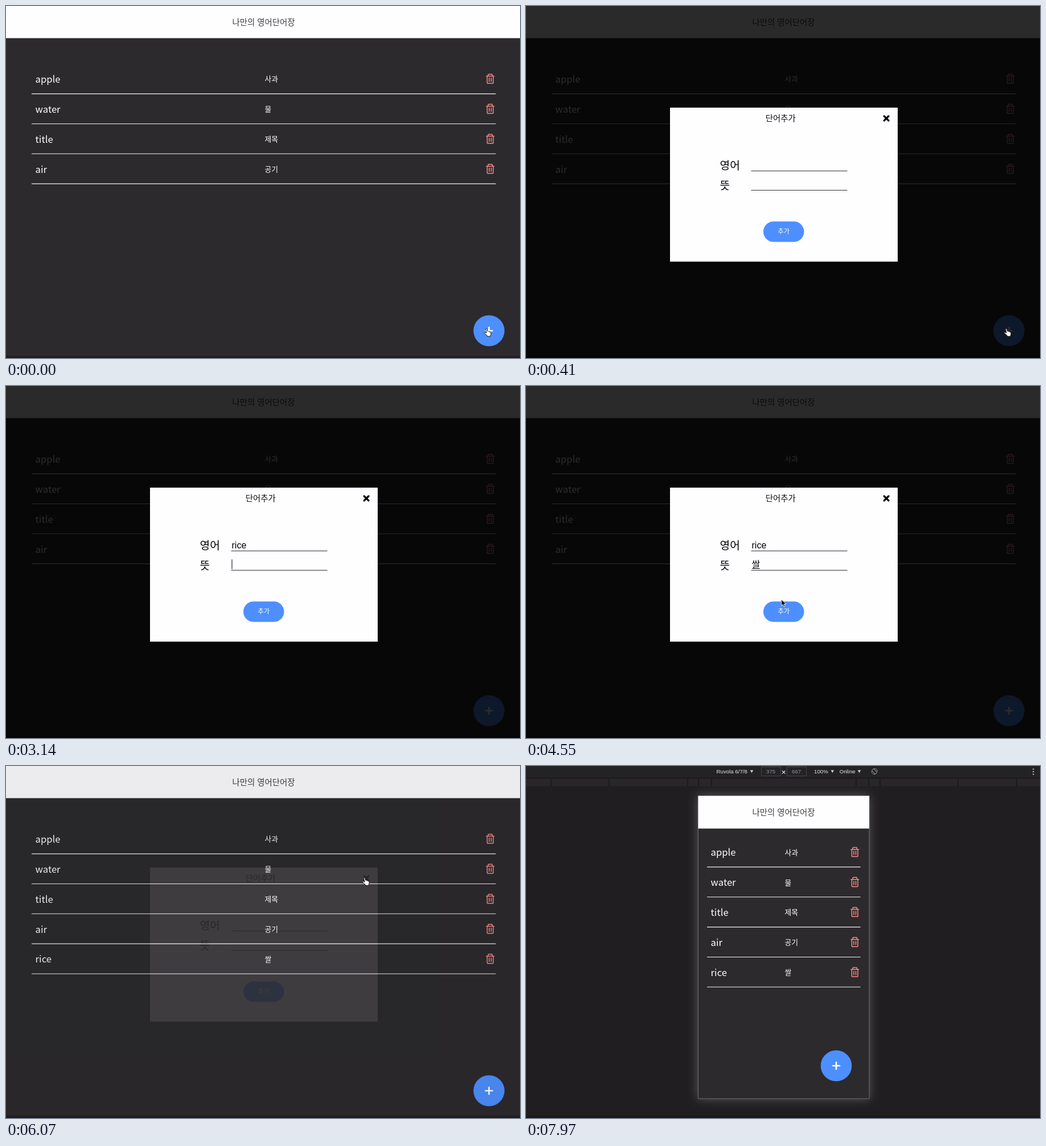
Animation, 903 px wide and 620 px high, one loop 8000 ms. Source, as an HTML page:

```html
<!DOCTYPE html>
<html lang="ko">
<head>
<meta charset="utf-8">
<title>나만의 영어단어장</title>
<style>
  html, body { margin: 0; width: 100%; height: 100%; overflow: hidden; background: #2c2a2d; }
  svg { display: block; width: 903px; height: 620px; }
  text { font-family: "Noto Sans CJK KR", "Noto Sans CJK", "Noto Sans KR", sans-serif; white-space: pre; }
  .title { font-size: 14.4px; font-weight: 500; fill: #3f3d40; text-anchor: middle; }
  .word { font-size: 16.65px; fill: #fefdff; }
  .meaning { font-size: 12.8px; font-weight: 300; fill: #fefdff; }
  .trash { fill: none; stroke: #f98b88; stroke-width: 1.5; stroke-linejoin: round; stroke-linecap: round; }
  .label { font-size: 19.2px; fill: #000; }
  .field { font: 16px "Liberation Sans", "Noto Sans CJK KR", "Noto Sans CJK", sans-serif; fill: #000; }
  .tool { font: 9.7px "Liberation Sans", Arial, sans-serif; fill: #e4e3e6; }
  .dim { fill: #929196; }
</style>
</head>
<body>
<svg id="stage" viewBox="0 0 903 620" xmlns="http://www.w3.org/2000/svg">
  <defs>
    <filter id="glow" x="-20%" y="-20%" width="140%" height="140%"><feGaussianBlur stdDeviation="9"/></filter>
  </defs>
  <g id="wide"></g>
  <g id="phone"></g>
  <g id="modal">
    <rect width="903" height="620" fill="#000" fill-opacity=".83"/>
    <rect x="253" y="179" width="400" height="271.3" fill="#fefdff"/>
    <text x="447.3" y="203.4" text-anchor="middle" font-size="14.4" font-weight="300" fill="#111">단어추가</text>
    <path d="M629.2 194l7.8 7.8M637 194l-7.8 7.8" stroke="#000" stroke-width="3.2" stroke-linecap="round"/>
    <text class="label" x="340.6" y="288.2">영어</text>
    <text class="label" x="340.6" y="322.8">뜻</text>
    <path d="M395.5 290.5h169M395.5 324.5h169" stroke="#333136" stroke-width="1.2"/>
    <text class="field" id="english" x="396.5" y="286"></text>
    <text class="field" id="korean" x="396.5" y="319.6"></text>
    <path id="compose" d="M397.2 321.4h13.6" stroke="#000"/>
    <rect id="caret" width="1" height="17"/>
    <rect x="417" y="379.5" width="71.5" height="36" rx="18" fill="#4d8fff"/>
    <text x="452.7" y="401.2" text-anchor="middle" font-size="11.2" font-weight="500" fill="#fff">추가</text>
  </g>
  <g id="cursor">
    <path id="hand" fill="#fff" stroke="#111" stroke-width="1" stroke-linejoin="round"
      d="M-1.3.8C-1.1-.5.7-.5 1.1.8L2.2 4.6C3-.1+3.5 4 4.2 4.5 4.6 5.2 3.9 6.3 4.2 6.6 5.1 7.3 4.7 8.5 5.2 8.6 6.1 8.9 8.5 8.2 10 7.7 11.6L7.6 13.6H1.6L.6 11.8C-.6 10.4-1.8 9-3.4 7.9-4.4 7-3.4 5.9-2.2 6.3L-.2 7.3Z"/>
    <path id="arrow" fill="#000" stroke="#fff" stroke-width=".9" stroke-linejoin="round"
      d="M0 0V11.2L2.6 8.8 4.4 13 6.4 12.2 4.6 8.1H8.2Z"/>
    <path id="ibeam" fill="none" stroke="#222" stroke-width="1.1"
      d="M-3-6.8Q0-6.8 0-5Q0-6.8 3-6.8M0-5V5M-3 6.8Q0 6.8 0 5Q0 6.8 3 6.8M-1.5.8h3"/>
  </g>
</svg>
<script>
const $ = id => document.getElementById(id);
const LOOP = 8000, ADDED = 4850, CUT = 7720;
const words = [['apple', '사과'], ['water', '물'], ['title', '제목'], ['air', '공기'], ['rice', '쌀']];

// A smooth pointing hand replaces the rough outline in the markup.
$('hand').setAttribute('d', 'M-1.2 1C-1.2-.4.6-.5 1 .9L2.1 4.7C3.2 4.2 4 4.5 4.3 5.2 5.3 4.9 6 5.2 6.3 6 7.4 5.8 8 6.4 8.1 7.5 8.4 9.4 8 10.6 7.4 11.8V13.6H1.8L1.4 12.2C-.2 10.9-1.4 9.4-3.2 8-4.2 7-3.2 5.9-2 6.4L.2 7.7Z');

const trash = (x, y) => `<path class="trash" transform="translate(${x} ${y})"
  d="M-6.8-4.6H6.8M-3.6-4.8V-7.2Q-3.6-8 -2.8-8H2.8Q3.6-8 3.6-7.2V-4.8M-5.3-4.4V7Q-5.3 8.1-4.2 8.1H4.2Q5.3 8.1 5.3 7V-4.4M-1.8-1.4V4.8M1.8-1.4V4.8"/>`;

const row = (left, right, dy, i) => {
  const y = dy + i * 52.85;
  return `<g class="row${i}"><text class="word" x="${left + 6.6}" y="${y + 135}">${words[i][0]}</text>
    <text class="meaning" x="454.6" y="${y + 133.4}">${words[i][1]}</text>
    ${trash(right - 9.8, y + 128.2)}
    <path d="M${left} ${y + 154.6}H${right}" stroke="#f3f2f4" stroke-width="1.1"/></g>`;
};
const list = (left, right, dy) => words.map((_, i) => row(left, right, dy, i)).join('');

const addButton = (x, y) => `<circle cx="${x}" cy="${y}" r="27.3" fill="#4d8fff"/>
  <path d="M${x - 6} ${y}h12M${x} ${y - 6}v12" stroke="#fff" stroke-width="2.7" stroke-linecap="round"/>`;

const strip = color => `<rect y="616.5" width="903" height="4" fill="${color}"/>`;

$('wide').innerHTML = `<rect width="903" height="620" fill="#2c2a2d"/>${strip('#231b20')}
  <rect width="903" height="56.6" fill="#fefdff"/>
  <text class="title" x="452.6" y="33.9">나만의 영어단어장</text>
  ${list(45, 860.5, 0)}${addButton(848.5, 572)}`;

const down = x => `<path d="M${x - 2.8} 7.2h5.6l-2.8 5z" fill="#c9c8cc"/>`;
const label = (x, text, dim = '') => `<text class="tool ${dim}" x="${x}" y="13">${text}</text>`;
const sizeBox = x => `<rect x="${x}" y="1.5" width="34" height="16" fill="#242326" stroke="#454348"/>`;
const marks = [44, 146, 284, 303, 326, 580, 602, 622, 759, 862];

$('phone').innerHTML = `<rect width="903" height="620" fill="#201e21"/>${strip('#1b161a')}
  <rect width="903" height="20.5" fill="#232225"/>
  <rect y="22" width="903" height="13.5" fill="#282629"/>
  <path d="M0 21.2H903${marks.map(x => `M${x} 22v13.5`).join('')}" stroke="#1a181b" stroke-width="1.6"/>
  ${label(334.5, 'Ruvola 6/7/8')}${down(396.5)}${sizeBox(413.5)}${sizeBox(458.5)}
  ${label(422, '375', 'dim')}${label(467, '667', 'dim')}
  <path d="M450 8.2l5.4 5.4M455.4 8.2l-5.4 5.4" stroke="#d8d7da" stroke-width="1.3"/>
  ${label(506, '100%')}${down(538.3)}${label(550.7, 'Online')}${down(585.5)}
  <g fill="none" stroke="#929196"><rect x="609.9" y="5" width="4.6" height="9" rx="1" transform="rotate(-45 612.2 9.5)"/>
    <path d="M611 4.6a5 5 0 0 1 6.2 5.6M613.4 14.4a5 5 0 0 1-6.2-5.6"/></g>
  ${[5.5, 10, 14.5].map(y => `<circle cx="891.3" cy="${y}" r="1.3" fill="#a9a8ac"/>`).join('')}
  <rect x="302" y="52" width="301" height="534" fill="#fff" fill-opacity=".26" filter="url(#glow)"/>
  <rect x="302.5" y="52.5" width="300.5" height="533.5" fill="#2c2a2d" stroke="#6f6d70"/>
  <rect x="302.5" y="52.7" width="300.5" height="57.5" fill="#fefdff"/>
  <text class="title" x="452.6" y="87.4">나만의 영어단어장</text>
  ${list(318, 587.5, 23.3)}${addButton(545, 528)}`;

// Step tables: [time, value], each held until the next.
const english = [[0, ''], [1560, 'r'], [1800, 'ri'], [2000, 'ric'], [2220, 'rice'], [ADDED, '']];
const korean = [[0, ''], [3180, 'ㅆ'], [3420, '싸'], [3700, '쌀'], [ADDED, '']];
const focus = [[0, ''], [1340, 'english'], [2800, 'korean'], [4720, '']];
const pointer = [[0, 'hand'], [830, 'arrow'], [1120, 'ibeam'], [1720, ''], [4250, 'ibeam'], [4330, 'arrow'],
  [4590, 'hand'], [5130, 'arrow'], [5600, 'hand'], [6160, 'arrow'], [6540, 'hand'], [CUT, '']];
const path = [[0, 843.8, 568.3], [800, 843.8, 568.3], [1240, 491.5, 277], [4250, 491.5, 277], [4550, 448.6, 376],
  [4690, 451, 391], [5080, 451, 391], [5660, 629.8, 196.8], [6120, 629.8, 196.8], [6610, 850, 124],
  [6760, 850, 124], [7400, 850, 336], [LOOP, 850, 336]];

const stepAt = (table, t) => table.filter(s => s[0] <= t).pop();
const valueAt = (table, t) => stepAt(table, t)[1];

const clamp = x => Math.min(1, Math.max(0, x));
const bezier = (a, b, u) => 3 * a * u * (1 - u) ** 2 + 3 * b * u * u * (1 - u) + u ** 3;
function ease(x) {
  let low = 0, high = 1;
  for (let i = 0; i < 24; i++) {
    const mid = (low + high) / 2;
    if (bezier(.25, .25, mid) < x) low = mid; else high = mid;
  }
  return bezier(.1, 1, low);
}
const fade = (t, start) => ease(clamp((t - start) / 300));

function position(t) {
  const i = path.findIndex(p => p[0] > t), a = path[i - 1], b = path[i];
  const u = (t - a[0]) / (b[0] - a[0]), k = u * u * (3 - 2 * u);
  return [a[1] + (b[1] - a[1]) * k, a[2] + (b[2] - a[2]) * k];
}

const show = (el, on) => { el.style.display = on ? '' : 'none'; };
const newRow = $('wide').querySelector('.row4');

function drawCaret(t) {
  const field = valueAt(focus, t);
  const last = Math.max(...[english, korean, focus].map(table => stepAt(table, t)[0]));
  show($('caret'), field && (t - last) % 1000 < 500);
  if (!field) return;
  const text = $(field);
  $('caret').setAttribute('x', 396.5 + (text.textContent ? text.getComputedTextLength() : 0));
  $('caret').setAttribute('y', field === 'english' ? 272 : 305.5);
}

function draw(t) {
  const opacity = t < 3000 ? fade(t, 58) : 1 - fade(t, 5876);
  show($('modal'), opacity > 0);
  $('modal').setAttribute('opacity', opacity);
  show($('wide'), t < CUT);
  show($('phone'), t >= CUT);
  show(newRow, t >= ADDED);

  $('english').textContent = valueAt(english, t);
  $('korean').textContent = valueAt(korean, t);
  show($('compose'), valueAt(korean, t) && t < 4720);
  drawCaret(t);

  const kind = valueAt(pointer, t);
  for (const name of ['hand', 'arrow', 'ibeam']) show($(name), name === kind);
  $('cursor').setAttribute('transform', `translate(${position(t)})`);
}

const start = performance.now();
function tick() {
  draw((performance.now() - start) % LOOP);
  requestAnimationFrame(tick);
}
tick();
</script>
</body>
</html>
```
